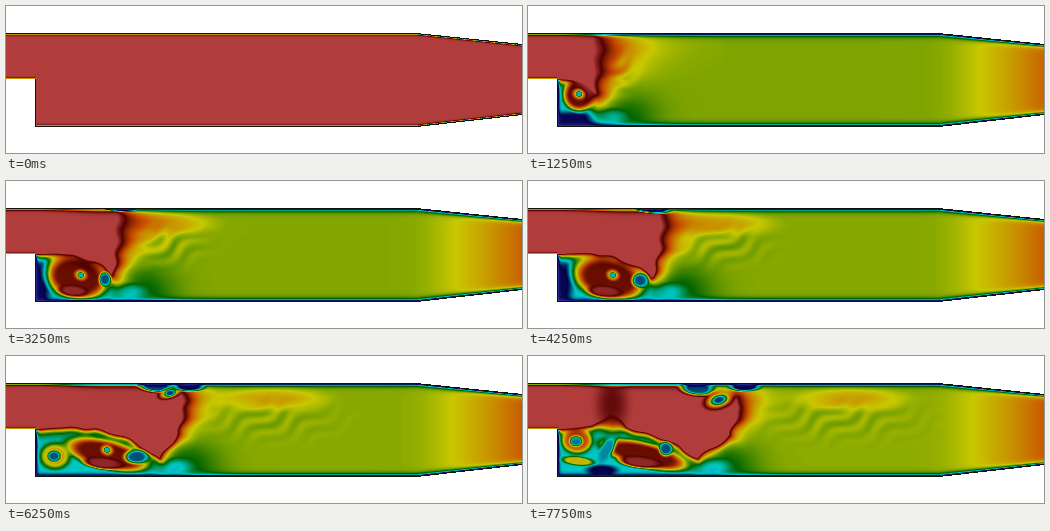
An HTML page with a canvas that plays this animation: 516 px wide and 147 px high, repeating every 8 s.

```html
<!DOCTYPE html>
<html lang="en">
<head>
<meta charset="utf-8">
<title>Flow past a step</title>
<style>
html, body { margin: 0; width: 100%; height: 100%; overflow: hidden; background: #fff; }
canvas { display: block; width: 516px; height: 147px; }
</style>
</head>
<body>
<canvas id="stage" width="516" height="147"></canvas>
<script>
const W = 516, H = 147, STEP = 250, STEPS = 32;
const ctx = document.getElementById('stage').getContext('2d');
const img = ctx.createImageData(W, H);

const clamp = v => Math.min(1, Math.max(0, v));
const mix = (a, b, t) => a + (b - a) * t;
const smooth = (a, b, v) => { const t = clamp((v - a) / (b - a)); return t * t * (3 - 2 * t); };
const bell = (x, r) => Math.exp(-(x * x) / (r * r));

// Speed colour scale, slightly shaded
const scale = [[71, 71, 219], [0, 0, 92], [0, 255, 255], [0, 128, 0],
  [255, 255, 0], [255, 97, 0], [107, 0, 0], [224, 77, 77]];
const lut = Array.from({ length: 513 }, (_, i) => {
  const p = i / 512 * 7, n = Math.min(6, Math.floor(p));
  return scale[n].map((c, j) => 0.785 * mix(c, scale[n + 1][j], p - n));
});

// Channel walls
const taper = x => Math.max(0, x - 410) / 106;
const roof = x => 28 + 11 * taper(x);
const floor = x => x < 30 ? 73 : 120 - 12 * taper(x);
const inside = (x, y) => y + 0.5 > roof(x) && y + 0.5 < floor(x);

// Jet geometry at step k
const frontX = k => 66 + 5.6 * (k - 5);
const tipX = k => frontX(k) - 42 * ((k - 5) / 26) ** 2;
const tipY = k => Math.min(102, 82 + 0.8 * k);

function jetOutline(k) {
  const f = frontX(k), tx = tipX(k), ty = tipY(k), sag = 20 * smooth(13, 31, k);
  const pts = [[-20, 20]];
  for (let i = 0; i <= 4; i++) pts.push([f - 5 - 70 * (1 - i / 4), 24 + sag * (i / 4) ** 1.3]);
  pts.push([f, 32 + sag], [mix(f, tx, 0.25), mix(32 + sag, ty, 0.55)]);
  const notch = 15 * smooth(26, 31, k);
  for (let p = 1; p >= 0; p -= 0.125) {
    const x = mix(29, tx, p);
    const bulge = 4 * clamp((k - 5) / 20) * Math.sin(Math.PI * p);
    pts.push([x, 73 + (ty - 73) * p ** 3 - bulge - notch * bell(x - 83, 12)]);
  }
  pts.push([-20, 73]);
  return pts;
}

// Distance to a polygon, zero inside
function distance(pts, x, y) {
  let best = 1e9, hit = false;
  for (let i = 0, j = pts.length - 1; i < pts.length; j = i++) {
    const [ax, ay] = pts[j], [bx, by] = pts[i], ex = bx - ax, ey = by - ay;
    const t = clamp(((x - ax) * ex + (y - ay) * ey) / (ex * ex + ey * ey));
    best = Math.min(best, (x - ax - t * ex) ** 2 + (y - ay - t * ey) ** 2);
    if ((ay > y) !== (by > y) && x < ax + (y - ay) / ey * ex) hit = !hit;
  }
  return hit ? 0 : Math.sqrt(best);
}

// Elliptic patches: those under the jet and those over it
function makePatches(k) {
  const under = [], over = [];
  const span = (a, b) => smooth(a - 2.5, a, k) * (1 - smooth(b, b + 3, k));
  const add = (list, w, val, x, y, rx, ry, ang = 0, soft = 0.45) => {
    if (w > 0) list.push({ w, val, x, y, rx, ry, soft, c: Math.cos(ang), s: Math.sin(ang) });
  };
  const f = frontX(k), n = k - 5, late = k - 25;
  const eyeX = 51 + 3.3 * n - 0.04 * n * n;
  const eyeY = 88 + 6 * smooth(5, 12, k);

  // plume along the roof
  add(under, span(10, 40), 0.62, 152 + 9.5 * (k - 13), 43, 42, 9, 0, 0.8);

  // slow corner and slow fluid below the tip
  add(under, span(0, 8), 0.13, 46, 116, 34, 10);
  add(under, span(10, 19), 0.13, 30, 98, 14, 36);
  add(under, 1, 0.27, tipX(k) + 14, 111, 15, 7, 0, 0.7);

  // main vortex
  const rx = 46 * (1 - Math.exp(-k / 13)), ry = 11 + 10 * bell(k - 14, 9);
  const vx = 51 + 2.5 * n, vy = 99 - 10 * Math.exp(-n / 6);
  add(under, span(3, 40), 0.83, vx, vy, rx, ry, 0.25, 0.35);
  add(under, span(12, 40), 0.95, vx - 4, vy + ry * 0.65, rx * 0.45, 5, 0.1);

  // left vortex
  const ly = 103 - 0.18 * Math.max(0, k - 21) ** 2;
  add(under, span(21, 40), 0.62, 49, ly, 14, 12);
  add(under, span(30, 40), 0.72, 49, ly, 12, 9);
  add(under, span(21, 40), 0.2, 48, ly, 6, 5);
  add(under, span(30, 40), 0.6, 50, 105, 15, 4, 0.1);

  // valley between the vortices
  add(under, span(30, 40), 0.24, 79, 93, 6, 15, 0.5);
  add(under, span(30, 40), 0.14, 74, 114, 15, 5);

  // vortex eye
  add(over, span(5, 25), 0.62, eyeX, eyeY, 6, 5, 0.3);
  add(over, span(5, 25), 0.27, eyeX, eyeY, 3, 2.5, 0.3);

  // second eye
  const m = k - 13;
  add(over, span(13, 40), 0.2, 99 + 3.6 * m - 0.08 * m * m, 98 + 4 * bell(k - 22, 5) - 0.3 * Math.max(0, late) ** 1.6,
    5 + 7 * bell(k - 23, 6), 6.5);

  // separation and vortex at the roof
  add(over, span(13, 40), 0.2, 112 + 3.2 * m, 28 + 0.25 * m, 16, 2 + 0.25 * m, 0.08);
  add(over, span(24, 40), 0.6, 164 + 4.5 * late, 37 + 1.15 * late, 11 + late / 2, 5 + late / 2, -0.3);
  add(over, span(24, 40), 0.18, 164 + 4.5 * late, 37 + 1.15 * late, 5 + late / 3, 3 + late / 6, -0.3, 0.6);
  add(over, span(25, 40), 0.15, f + 5, 31, 14, 4);

  // dark fan above the notch
  add(over, span(31, 40), 0.88, 84, 48, 13, 22, 0, 0.8);
  return { under, over };
}

function blend(v, list, x, y) {
  for (const p of list) {
    const dx = x - p.x, dy = y - p.y;
    const q = Math.hypot((dx * p.c + dy * p.s) / p.rx, (dy * p.c - dx * p.s) / p.ry);
    if (q < 1 + p.soft) v = mix(v, p.val, p.w * (1 - smooth(1 - p.soft, 1 + p.soft, q)));
  }
  return v;
}

function makeField(k) {
  if (k === 0) return () => 1;
  const pts = jetOutline(k), { under, over } = makePatches(k);
  const front = frontX(k), tip = tipX(k);
  const reach = 11 + 17 * bell(k, 15), core = 0.517 + 0.0004 * k;
  const wx = 160 + 8.3 * (k - 13), wr = Math.max(8, 30 + 2.2 * (k - 13));
  const amp = mix(0.05, 0.022, clamp((k - 5) / 16));

  return (x, y) => {
    const ramp = 8 * Math.log(1 + Math.exp((x - 412) / 8));
    let v = core * 92 / (92 - 23 * ramp / 106);
    if (x > 420) return v;
    v -= 0.12 * bell(x - tip - 22, 38) * smooth(66, 112, y);
    v = mix(v, 0.29, smooth(tip + 14, tip - 10, x) * smooth(66, 76, y));
    v = blend(v, under, x, y);

    const wave = Math.sin(0.2 * (x - wx) + 0.34 * y + 1.6 * Math.sin(0.11 * x - 0.09 * y));
    v += amp * wave * bell(x - wx, wr) * bell(y - 64, 17);

    if (x < front + 130) {
      const wob = smooth(50, 80, x);
      const d = distance(pts, x + wob * 1.4 * Math.sin(0.28 * y + k), y + wob * Math.sin(0.22 * x - k));
      const ahead = smooth(front - 15, front + 5, x);
      const len = mix(4, reach * mix(1, 0.45, smooth(40, 90, y)), ahead);
      v = mix(v, 1, Math.exp(-d / len));
    }
    return blend(v, over, x, y);
  };
}

const wall = (d, t) => 1 - Math.exp(-(d + 0.1) / t);

function draw(k) {
  const field = makeField(k), px = img.data;
  for (let y = 0, o = 0; y < H; y++) {
    for (let x = 0; x < W; x++, o += 4) {
      let rgb = [255, 255, 255];
      if (inside(x, y)) {
        const thick = k ? mix(0.8, 1.6, smooth(30, 100, x)) : 0.6;
        let v = field(x + 0.5, y + 0.5) * wall(y + 0.5 - roof(x), thick);
        v *= wall(floor(x) - y - 0.5, k && x > 29 ? 1.6 : 0.6);
        if (k && y > 73) v *= wall(x - 29.5, 1.2);
        rgb = lut[Math.round(clamp(v) * 512)];
      } else if (inside(x, y + 1) || (x > 29 && inside(x, y - 1)) || (x === 29 && y > 72 && y < 121)) {
        rgb = [16, 18, 14];
      }
      px[o] = rgb[0];
      px[o + 1] = rgb[1];
      px[o + 2] = rgb[2];
      px[o + 3] = 255;
    }
  }
  ctx.putImageData(img, 0, 0);
}

let shown = 0;
function tick(now) {
  const k = Math.floor(now / STEP) % STEPS;
  if (k !== shown) draw(shown = k);
  requestAnimationFrame(tick);
}
draw(0);
requestAnimationFrame(tick);
</script>
</body>
</html>
```
